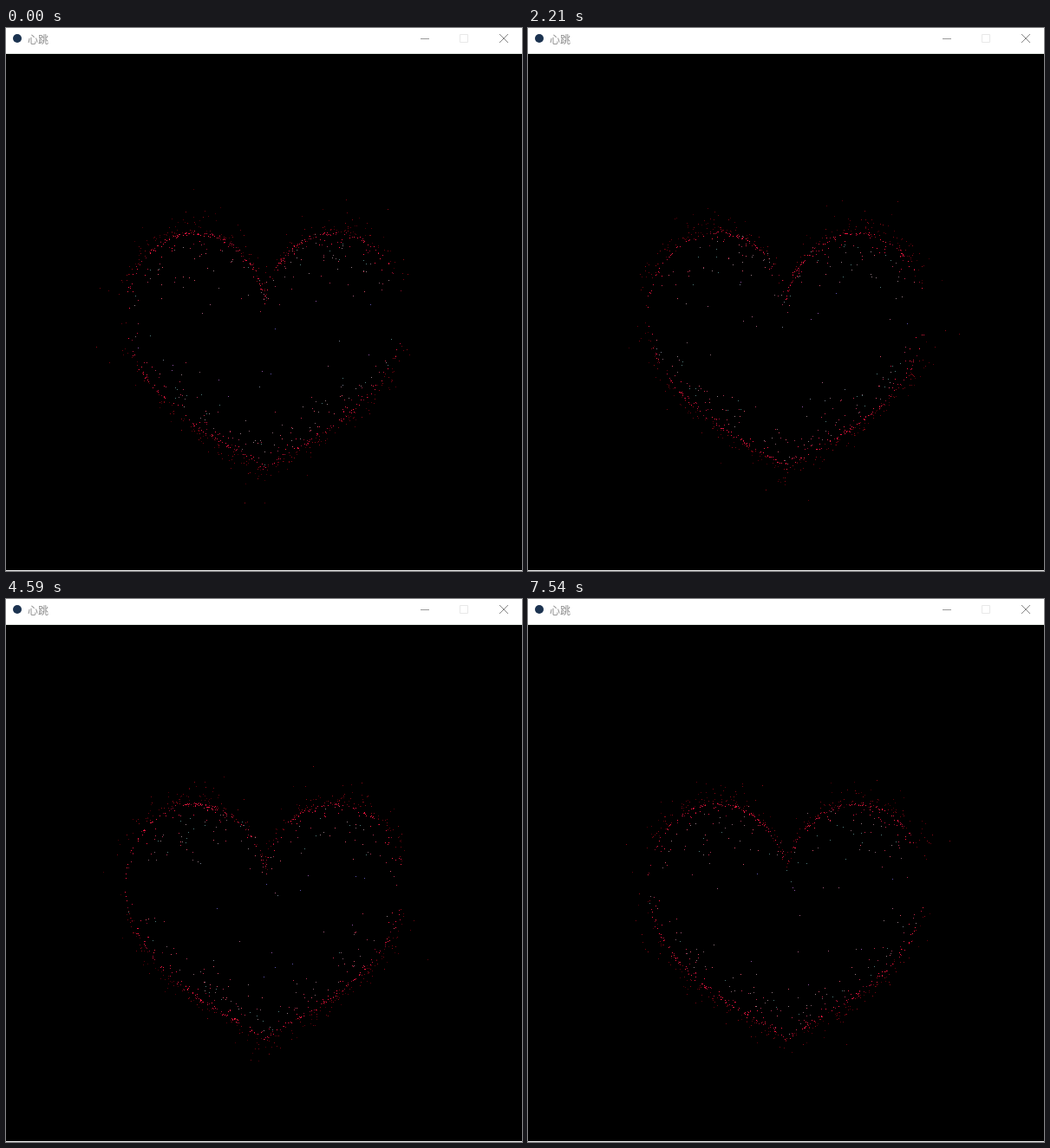
An HTML page with a canvas for the animation above (7.61 s loop, 595 by 627 pixels).

```html
<!DOCTYPE html>
<html lang="zh">
<head>
<meta charset="utf-8">
<title>心跳</title>
<style>
  html, body { margin: 0; width: 100%; height: 100%; overflow: hidden; background: #000; }
  .bar {
    position: absolute; left: 0; top: 0; width: 595px; height: 29px;
    background: #fff; border-bottom: 1px solid #e2e6e2;
  }
  .bar span {
    position: absolute; left: 25px; top: 4px; color: #8c8c8c;
    font: 300 12px/17px "Noto Sans CJK SC", "Noto Sans CJK", sans-serif;
  }
  .bar svg { position: absolute; left: 0; top: 0; }
  canvas { position: absolute; left: 0; top: 30px; }
  .edge { position: absolute; left: 0; top: 626px; width: 595px; height: 1px; background: #f0f0f0; }
</style>
</head>
<body>
<div class="bar">
  <svg width="595" height="29" fill="none" stroke="#999">
    <circle cx="13" cy="12" r="5" fill="#1c3350" stroke="none"/>
    <path d="M478 12.5h10"/>
    <path d="M523.5 7.5h9v9h-9z" stroke="#e8e8e8"/>
    <path d="M569 7l10 10M579 7l-10 10" stroke="#888"/>
  </svg>
  <span>心跳</span>
</div>
<canvas width="595" height="596"></canvas>
<div class="edge"></div>
<script>
const LOOP = 7610, STEPS = 127;
const CX = 298, CY = 375, TOP = 30;
// start of each run of redraws, and how many redraws it holds
const MARKS = [50, 850, 1620, 2390, 3170, 3950, 4770, 5580, 6350, 7130, 7595];
const COUNTS = [13, 13, 13, 13, 13, 14, 13, 13, 13, 8];
const LINE = ['#ff1440', '#e41440', '#c01038', '#f02040', '#900c2c'];
const HALO = ['#480008', '#5c000c', '#700410', '#880814'];
const INNER = ['#c02848', '#a83050', '#d04860', '#4c7878', '#907880', '#80606c'];
const DEEP = ['#5a50a8', '#8a50a0', '#707888', '#a05878'];
const ctx = document.querySelector('canvas').getContext('2d');

function seeded(seed) {
  let a = seed * 0x9e3779b1 + 77 | 0;
  return () => {
    a = a + 0x6d2b79f5 | 0;
    let r = Math.imul(a ^ a >>> 15, 1 | a);
    r = r + Math.imul(r ^ r >>> 7, 61 | r) ^ r;
    return ((r ^ r >>> 14) >>> 0) / 4294967296;
  };
}

function heart(t) {
  const x = 160 * Math.sin(t) ** 3;
  const y = 364 - 131 * Math.cos(t) + 41 * Math.cos(2 * t)
    + 33.6 * Math.cos(3 * t) + 7 * Math.cos(4 * t);
  return [x, y - CY];
}

function stepAt(ms) {
  let n = 0;
  for (let i = 0; i < COUNTS.length; i++) {
    const k = (ms - MARKS[i]) / (MARKS[i + 1] - MARKS[i]) * COUNTS[i] + 0.1;
    if (k < 0) return n;
    if (k < COUNTS[i]) return n + Math.floor(k) + 1;
    n += COUNTS[i];
  }
  return STEPS - 1;
}

function draw(n) {
  const rnd = seeded(n + 1);
  const expo = mean => -mean * Math.log(1 - rnd());
  const spread = r => (rnd() + rnd() - 1) * r;
  const pick = list => list[Math.floor(rnd() * list.length)];
  const beat = n % 5 === 4 ? 1.03 : 1;
  // evenly spread across the width, so the steep sides stay sparse
  const point = () => {
    const t = Math.asin(Math.cbrt(rnd() * 1.985 - 1));
    return heart(rnd() < 0.5 ? t : Math.PI - t);
  };
  const dot = (x, y, color) => {
    ctx.fillStyle = color;
    ctx.fillRect(Math.round(CX + x * beat), Math.round(CY + y * beat) - TOP, 1, 1);
  };

  ctx.fillStyle = '#000';
  ctx.fillRect(0, 0, 595, 596);

  for (let i = 0; i < 430; i++) {
    const [x, y] = point();
    dot(x * (1 + expo(0.05)) + spread(5), y * (1 + expo(0.065)) + spread(4), pick(HALO));
  }
  for (let i = 0; i < 330; i++) {
    const [x, y] = point();
    const u = Math.min(0.9, expo(0.1)), v = Math.min(0.9, expo(0.17));
    const depth = Math.hypot(u, v);
    dot(x * (1 - u) + spread(4), y * (1 - v),
      pick(depth > 0.5 ? DEEP : depth > 0.12 ? INNER : LINE));
  }
  for (let i = 0; i < 270; i++) {
    const [x, y] = point();
    dot(x + spread(2.5), y + spread(2.5), pick(LINE));
  }
}

const start = performance.now();
let shown = -1;
function tick() {
  const n = stepAt((performance.now() - start) % LOOP);
  if (n !== shown) draw(shown = n);
  requestAnimationFrame(tick);
}
tick();
</script>
</body>
</html>
```
